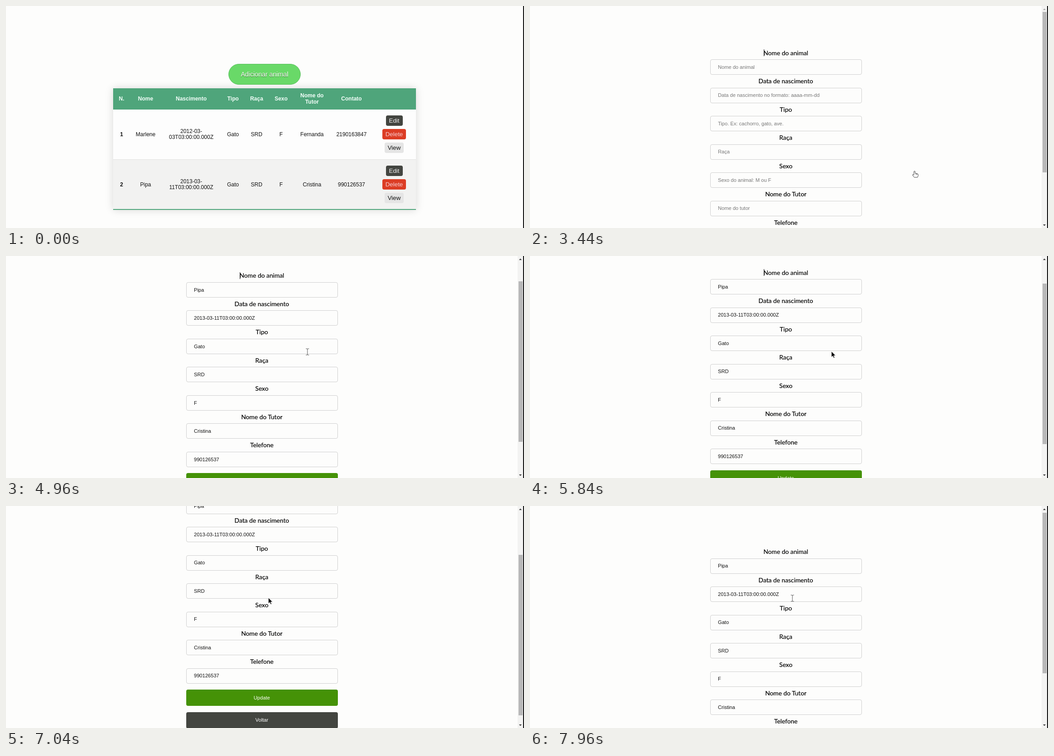
An HTML page that plays this animation: 1141x491 px, repeating every 8000 ms.

```html
<!DOCTYPE html>
<html lang="pt">
<head>
<meta charset="utf-8">
<title>Cadastro de animais</title>
<style>
html, body { margin: 0; width: 100%; height: 100%; overflow: hidden; background: #fdfdfc; }
#stage { position: relative; width: 1141px; height: 491px; overflow: hidden; font: 12px/16px "Liberation Sans", Arial, sans-serif; color: #111; }
#stage div { position: absolute; box-sizing: border-box; white-space: pre; }
#list, #form { left: 0; top: 0; width: 1141px; height: 491px; }
#table { box-shadow: 0 0 17px rgba(0, 0, 0, .15); }
.t { width: 240px; height: 16px; text-align: center; }
#stage .left { text-align: left; font-size: 11.1px; }
.head { font-weight: bold; color: #f4fffa; }
.bold { font-weight: bold; }
.btn { font-size: 13.33px; }
.white { color: #f2f2f2; }
.pink { color: #f8cfd4; }
.add { font-size: 14.17px; color: #fff; text-shadow: 0 1px 0 #2f6627; }
.label { font: 13.8px/16px Lato, sans-serif; color: #000; -webkit-text-stroke: .2px #000; }
.field { border: 1px solid #cfcfcf; border-radius: 4px; }
.send { font-size: 11.1px; color: #fff; }
.hint { color: #777; }
svg { position: absolute; left: 0; top: 0; overflow: visible; }
</style>
</head>
<body>
<div id="stage">
  <div id="list"></div>
  <div id="form"></div>
  <div id="bar"></div>
  <svg id="arrows" width="1141" height="491">
    <path id="up" d="M1130 9h6l-3-3.5z"/>
    <path d="M1130 483h6l-3 3.5z" fill="#444"/>
  </svg>
  <svg id="mouse" width="20" height="24">
    <path id="arrow" d="M0 0v12.6l3-2.6 2.1 4.6 2-.9-2.1-4.5h4z" fill="#000" stroke="#fff" stroke-width=".7"/>
    <path id="beam" d="M-3.5-7h2.5l1 1 1-1h2.5M0-6v12M-3.5 7h2.5l1-1 1 1h2.5" fill="none" stroke="#555"/>
    <path id="hand" d="M-1.3 7.5V.8Q0-.8 1.3.8V5l5.2 1Q8 6.4 8 8v2.5L6.5 14H-.5L-4.4 9.2Q-4.6 7.4-2.8 7.7L-1.3 9zM3.3 5.5V8M5.5 6v2" fill="#fff" stroke="#444"/>
  </svg>
</div>
<script>
const $ = id => document.getElementById(id);

function box(parent, x, y, w, h, style = '', cls = '') {
  const el = document.createElement('div');
  el.className = cls;
  el.style.cssText = `left:${x}px;top:${y}px;width:${w}px;height:${h}px;${style}`;
  parent.append(el);
  return el;
}

function text(parent, x, y, str, cls = '') {
  const el = document.createElement('div');
  el.className = 't ' + cls;
  el.textContent = str;
  el.style.left = (cls.includes('left') ? x : x - 120) + 'px';
  el.style.top = y - 8 + 'px';
  parent.append(el);
  return el;
}

// Animal list
const list = $('list'), green = '#4fa57b', dark = '#434540';
box(list, 236, 182, 667, 269, 'background:#fdfdfd').id = 'table';
box(list, 236, 182, 667, 46.5, 'background:' + green);
box(list, 236, 339, 667, 1, 'background:#e2e2e2');
box(list, 236, 340, 667, 110, 'background:#f2f2f1');
box(list, 236, 449, 667, 2, 'background:' + green);
box(list, 490, 128, 159, 46, 'background:#69d968;border:1px solid #55bd59;border-radius:23px');
text(list, 569.5, 150.5, 'Adicionar animal', 'add');

const cols = [254.5, 307.5, 408, 500, 552, 606, 674, 761];
const write = (x, y, str, cls) => {
  const lines = str.split('\n');
  lines.forEach((s, i) => text(list, x, y + (i - (lines.length - 1) / 2) * 13.5, s, cls));
};
['N.', 'Nome', 'Nascimento', 'Tipo', 'Raça', 'Sexo', 'Nome do\nTutor', 'Contato']
  .forEach((s, i) => write(cols[i], 205, s, 'head'));
[
  ['1', 'Marlene', '2012-03-\n03T03:00:00.000Z', 'Gato', 'SRD', 'F', 'Fernanda', '2190163847'],
  ['2', 'Pipa', '2013-03-\n11T03:00:00.000Z', 'Gato', 'SRD', 'F', 'Cristina', '990126537']
].forEach((row, r) => {
  const y = r * 111;
  row.forEach((s, i) => write(cols[i], 283.5 + y, s, i ? '' : 'bold'));
  [['Edit', 37, dark, 'white'], ['Delete', 52, '#dc3d25', 'pink'], ['View', 42, '#e5e5e5', '']]
    .forEach(([s, w, color, cls], i) => {
      box(list, 855 - w / 2, 242 + y + i * 30, w, 23, `background:${color};border-radius:4px`);
      text(list, 855, 253.5 + y + i * 30, s, 'btn ' + cls);
    });
});

// Edit form
const form = $('form'), pitch = 62.5, top0 = 118;
const fields = [
  ['Nome do animal', 'Nome do animal', 'Pipa'],
  ['Data de nascimento', 'Data de nascimento no formato: aaaa-mm-dd', '2013-03-11T03:00:00.000Z'],
  ['Tipo', 'Tipo. Ex: cachorro, gato, ave.', 'Gato'],
  ['Raça', 'Raça', 'SRD'],
  ['Sexo', 'Sexo do animal: M ou F', 'F'],
  ['Nome do Tutor', 'Nome do tutor', 'Cristina'],
  ['Telefone', 'Telefone', '990126537']
];
const inputs = fields.map(([label, hint], i) => {
  const y = i * pitch;
  text(form, 563.5, 103.5 + y, label, 'label');
  box(form, 397, top0 + y, 334, 34, '', 'field');
  return text(form, 414, 134.8 + y, hint, 'left');
});
[['Update', 540.5, '#459207'], ['Voltar', 590, dark]].forEach(([s, y, color]) => {
  box(form, 397, y, 334, 36, `background:${color};border-radius:4px`);
  text(form, 563.5, y + 17.8, s, 'send');
});
const caret = box(form, 515, 96, 1, 15, 'background:#000');

// Scrollbar and window edge
const bar = $('bar');
box(bar, 1127, 0, 12, 491, 'background:#f3f3f2');
const thumb = box(bar, 1128.5, 13, 9, 355, 'background:#b8b8b8');
box($('stage'), 1139, 0, 2, 491, 'background:#111');

// Motion: [start, end, from, to]
const scrolls = [[4550, 5060, 0, 67], [6430, 6910, 67, 134.5], [7510, 7998, 134.5, 0]];
const moves = [
  [2240, 2920, [790, 434], [847, 365]],
  [3880, 4160, [847, 365], [664, 212]],
  [5840, 6160, [664, 212], [578, 204]]
];
const blinks = [3920, 4600, 5240, 5840, 6440, 7040, 7640];
const OPEN = 3320, FILL = 3600;

const ease = p => p * p * (3 - 2 * p);
const mix = (a, b, p) => a + (b - a) * p;
const show = (el, on) => el.style.display = on ? '' : 'none';

function at(steps, t, blend) {
  let step = steps[0];
  for (const s of steps) if (t >= s[0]) step = s;
  const [a, b, from, to] = step;
  return blend(from, to, ease(Math.min(1, Math.max(0, (t - a) / (b - a)))));
}

function draw(t) {
  const open = t >= OPEN, filled = t >= FILL;
  const s = at(scrolls, t, mix);
  const [x, y] = at(moves, t, (a, b, p) => a.map((v, i) => mix(v, b[i], p)));

  show(list, !open);
  show(form, open);
  show(bar, open);
  show($('arrows'), open);
  form.style.top = -s + 'px';
  thumb.style.top = 13 + s * .71 + 'px';
  $('up').setAttribute('fill', s > 0 ? '#444' : '#aaa');
  show(caret, blinks.filter(b => t >= b).length % 2 === 0);
  inputs.forEach((el, i) => {
    el.textContent = fields[i][filled ? 2 : 1];
    el.classList.toggle('hint', !filled);
  });

  const inField = open && x > 397 && x < 731 &&
    fields.some((f, i) => y > top0 + i * pitch - s + 1 && y < top0 + i * pitch - s + 32.5);
  const onEdit = !open && x > 836 && y < 376;
  const kind = onEdit || (open && t < 3920) ? 'hand' : inField ? 'beam' : 'arrow';
  for (const k of ['arrow', 'beam', 'hand']) show($(k), k === kind);
  show($('mouse'), t >= 2280);
  $('mouse').style.transform = `translate(${Math.round(x)}px,${Math.round(y) - (kind === 'arrow' ? 1 : 0)}px)`;
}

function tick() {
  const t = performance.now() % 8000;
  draw(Math.floor(t / 40) * 40);
  requestAnimationFrame(tick);
}
tick();
</script>
</body>
</html>
```
